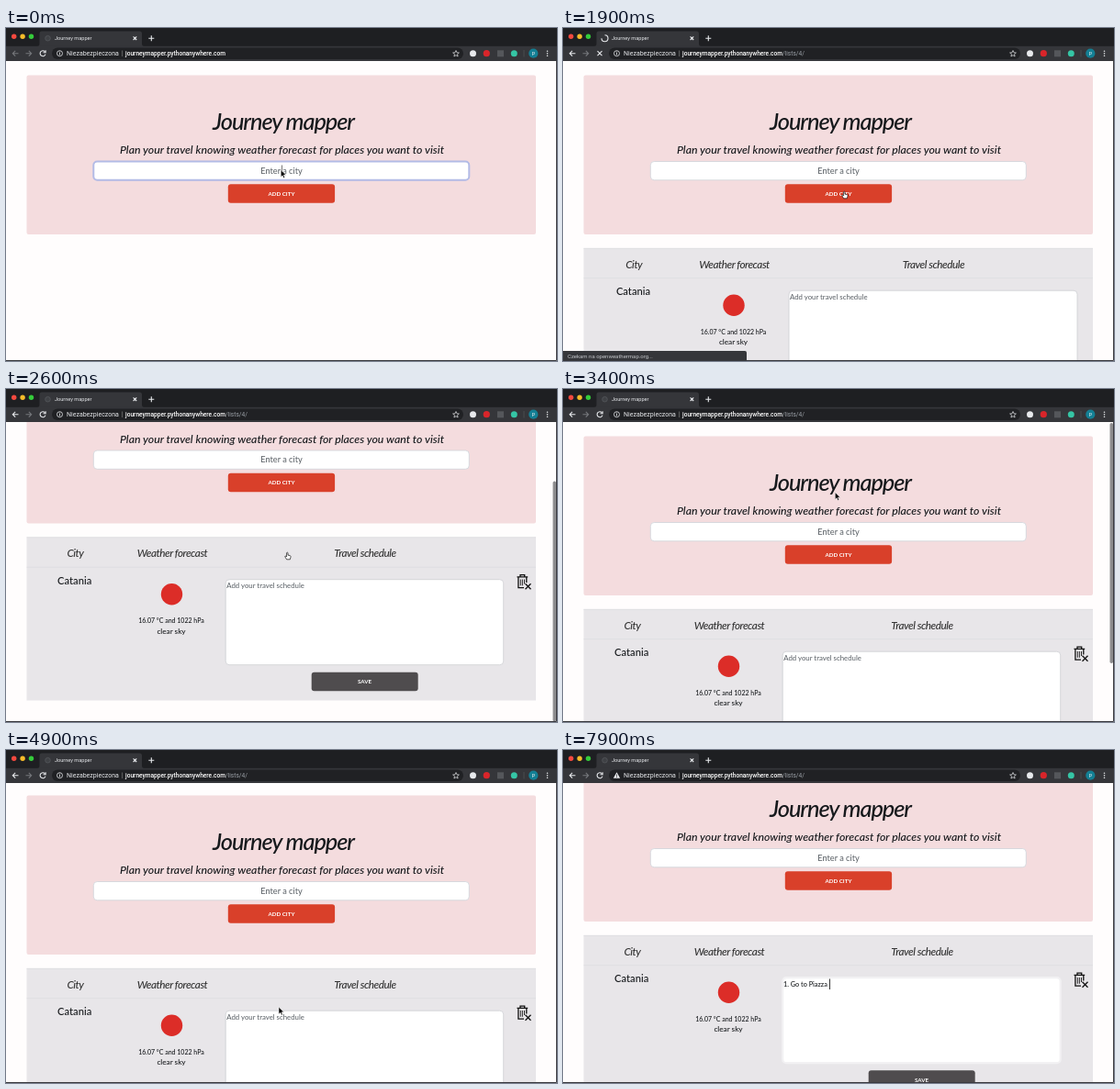
An HTML page for the animation above (8000 ms loop, 600x363 px).

```html
<!DOCTYPE html>
<html lang="en">
<head>
<meta charset="utf-8">
<title>Journey mapper</title>
<style>
  html, body { margin: 0; width: 100%; height: 100%; overflow: hidden; background: #fffdfd; }
  svg { display: block; width: 600px; height: 363px; }
  text { white-space: pre; font-family: Lato, sans-serif; fill: #16191c; }
  .mid { text-anchor: middle; }
  .hand { font-style: italic; font-weight: 500; text-anchor: middle; }
  .head { font-size: 11.7px; letter-spacing: -.45px; fill: #333; }
  .body { font-weight: 500; }
  .ui { font-family: Roboto, sans-serif; fill: #e8eaed; }
  .hint { fill: #565c62; }
  .btn { font-size: 6.2px; font-weight: 700; fill: #fff; text-anchor: middle; }
  .line { fill: none; stroke: #e8eaed; stroke-width: 1.1; }
</style>
</head>
<body>
<svg viewBox="0 0 600 363" xmlns="http://www.w3.org/2000/svg">
  <rect width="600" height="363" fill="#fffdfd"/>

  <g id="page">
    <rect x="22.5" y="51.5" width="554.5" height="173.5" rx="2" fill="#f4dcde"/>
    <text class="hand" x="302" y="110.5" font-size="25.4" letter-spacing="-1.1">Journey mapper</text>
    <text class="hand" x="300.5" y="137" font-size="12.3">Plan your travel knowing weather forecast for places you want to visit</text>
    <rect id="cityBox" x="95.3" y="145.5" width="409" height="20.3" rx="4" fill="#fff"/>
    <text id="cityHint" class="mid hint" x="300" y="158.6" font-size="9.2">Enter a city</text>
    <text id="cityText" class="mid" x="300" y="158.6" font-size="9.2"></text>
    <rect id="cityCaret" y="149.5" width=".8" height="11" fill="#555"/>
    <rect x="241.8" y="170.3" width="116.3" height="20.4" rx="3" fill="#d9402a"/>
    <text class="btn" x="300" y="182.8">ADD CITY</text>

    <g id="table">
      <rect x="22.5" y="240" width="554.5" height="178" fill="#e8e6e9"/>
      <path d="M22.5 240.3H577M22.5 272.7H577" stroke="#dcdce0" stroke-width=".8"/>
      <g id="cityCol">
        <text class="hand head" x="75.5" y="261.5">City</text>
        <text class="mid body" x="74.7" y="291.2" font-size="11.2">Catania</text>
      </g>
      <g id="skyCol">
        <text class="hand head" x="181" y="261.5">Weather forecast</text>
        <circle cx="180.5" cy="302.2" r="11.7" fill="#dc2d28"/>
        <text class="mid body" x="180" y="333.5" font-size="7">16.07 °C and 1022 hPa</text>
        <text class="mid body" x="180" y="345" font-size="8.2">clear sky</text>
      </g>
      <g id="planCol">
        <text class="hand head" x="391" y="261.5">Travel schedule</text>
        <rect x="332.7" y="387.3" width="116" height="20.4" rx="3" fill="#4f4c4e"/>
        <text class="btn" x="390.5" y="399.8">SAVE</text>
      </g>
      <rect id="noteBox" y="286.2" height="93" rx="4" fill="#fff"/>
      <text id="noteHint" class="hint" y="295.6" font-size="7.8">Add your travel schedule</text>
      <text id="noteText" class="body" x="240" y="295.6" font-size="7.3"></text>
      <rect id="noteCaret" y="287.5" width=".9" height="11.5" fill="#222"/>
      <g id="bin" fill="none" stroke="#111" stroke-width="1.3">
        <path d="M556.5 283.4H568.2M560 283.2V281.2H564.7V283.2M557.9 284V295.2H564M566.8 284V289.5"/>
        <path d="M560.3 286V292.8M562.4 286V292.8M564.5 286V291" stroke-width=".9"/>
        <path d="M565.5 290.7L571.5 296.7M571.5 290.7L565.5 296.7"/>
      </g>
    </g>
  </g>

  <rect id="thumb" x="595.5" width="3.6" height="262" rx="1.8" fill="#8d8d8f"/>
  <path d="M0 362.5H599.5V36" fill="none" stroke="#3a3a3f"/>

  <rect width="600" height="20" fill="#1e1f22"/>
  <circle cx="8.7" cy="9.3" r="2.7" fill="#f4493f"/>
  <circle cx="18.1" cy="9.3" r="2.7" fill="#f8bc2a"/>
  <circle cx="27.5" cy="9.3" r="2.7" fill="#35cc3b"/>
  <path d="M34 20Q36.5 20 36.5 17V6Q36.5 3.5 39 3.5H145.5Q148 3.5 148 6V17Q148 20 150.5 20Z" fill="#35363a"/>
  <circle id="icon" cx="45.5" cy="11.2" r="2.8" fill="#3f4145" stroke="#5a5c60" stroke-width=".7"/>
  <path id="spin" class="line" d="M45.5 7.7A3.5 3.5 0 1 1 42 11.2"/>
  <text class="ui" x="53" y="13.2" font-size="5.6">Journey mapper</text>
  <path class="line" d="M138.6 9.4L142.2 13M142.2 9.4L138.6 13M155.3 11.2H161.3M158.3 8.2V14.2"/>

  <rect y="19.8" width="600" height="16.2" fill="#35363a"/>
  <rect x="50" y="21.5" width="448" height="12.5" rx="6.2" fill="#202124"/>
  <path id="back" class="line" d="M13.5 27.7H7.3M10.2 24.8L7.3 27.7L10.2 30.6"/>
  <path class="line" style="stroke:#76787c" d="M21.5 27.7H27.7M24.8 24.8L27.7 27.7L24.8 30.6"/>
  <path id="reload" class="line" d="M42.3 25.6A3 3 0 1 0 43 28.6M43.1 24.2V26.7H40.6"/>
  <path id="stop" class="line" d="M37.5 25.2L42.5 30.2M42.5 25.2L37.5 30.2"/>
  <g id="info">
    <circle class="line" style="stroke-width:.8" cx="58.5" cy="27.7" r="3"/>
    <path class="line" style="stroke-width:.9" d="M58.5 27.2V29.4M58.5 25.7V26.5"/>
  </g>
  <g id="warn">
    <path d="M58.5 24.3L62.2 30.7H54.8Z" fill="#e8eaed"/>
    <path d="M58.5 26.6V28.6M58.5 29.1V29.9" stroke="#202124" stroke-width=".8"/>
  </g>
  <text class="ui" x="66" y="30.1" font-size="7">Niezabezpieczona</text>
  <path d="M126.5 24.5V31" stroke="#777" stroke-width=".7"/>
  <text class="ui body" x="130" y="30.1" font-size="6.6" style="fill:#fff">journeymapper.pythonanywhere.com<tspan id="path" fill="#9aa0a6" font-weight="400"></tspan></text>
  <path class="line" style="stroke-width:.7" d="M490 24.5L491 26.8L493.4 27L491.5 28.6L492.1 31L490 29.7L487.9 31L488.5 28.6L486.6 27L489 26.8Z"/>
  <circle cx="508.5" cy="27.7" r="3.5" fill="#e8eaed"/>
  <circle cx="523.3" cy="27.7" r="3.6" fill="#d9252a"/>
  <rect x="535" y="24.3" width="7" height="7" fill="#55575b"/>
  <circle cx="553.3" cy="27.7" r="3.5" fill="#35c5a5"/>
  <path d="M564 24V31.5" stroke="#55575b" stroke-width=".7"/>
  <circle cx="574.3" cy="27.7" r="5.1" fill="#137f94"/>
  <text class="ui mid" x="574.3" y="29.8" font-size="5.8">P</text>
  <g fill="#e8eaed"><circle cx="589.5" cy="25.2" r=".8"/><circle cx="589.5" cy="27.7" r=".8"/><circle cx="589.5" cy="30.2" r=".8"/></g>

  <g id="status">
    <path d="M0 352H198Q200 352 200 354V363H0Z" fill="#35363a"/>
    <text id="statusText" class="ui" x="5" y="359.6" font-size="6" style="fill:#c4c6ca"></text>
  </g>

  <g id="pointer">
    <path id="arrow" d="M0 0V7.6L1.8 6L3 8.8L4.3 8.2L3.1 5.5H5.5Z" fill="#000" stroke="#fff" stroke-width=".5"/>
    <path id="beam" d="M-1.5 -3.6Q0 -3.6 0 -2.6Q0 -3.6 1.5 -3.6M0 -2.6V2.6M-1.5 3.6Q0 3.6 0 2.6Q0 3.6 1.5 3.6M-.8 .8H.8" fill="none" stroke="#222" stroke-width=".9"/>
    <path id="finger" d="M-1.4 -3.4Q-.7 -4.3 0 -3.4V-.9L2.4 -.4Q3.2 0 3 1.2L2.3 3.8H-1.4L-3.2 .8Q-3.2 -.3 -2.2 .1L-1.4 .9Z" fill="#fff" stroke="#111" stroke-width=".7"/>
  </g>
</svg>

<script>
const LOOP = 8000, STEP = 100;
const el = {};
document.querySelectorAll('[id]').forEach(n => el[n.id] = n);

const show = (n, on) => n.style.display = on ? '' : 'none';
const set = (n, attrs) => { for (const k in attrs) n.setAttribute(k, attrs[k]); };
const within = (t, a, b) => t >= a && t < b;
const clamp = v => Math.max(0, Math.min(1, v));
const smooth = v => v * v * (3 - 2 * v);
const ramp = (t, a, b) => smooth(clamp((t - a) / (b - a)));

// keys: [time, x, y]
const pointerPath = [
  [900, 299.3, 154.8], [1000, 301, 160], [1300, 307, 182], [3000, 307, 182],
  [3600, 291, 78], [3800, 236, 31], [4000, 90, 24], [4100, 9, 12],
  [4300, 130, 27], [4500, 258, 31], [4600, 272, 60], [4800, 296, 260], [4900, 297, 280.3]
];
function along(keys, t) {
  if (t <= keys[0][0]) return keys[0].slice(1);
  for (let i = 1; i < keys.length; i++) {
    const [t0, x0, y0] = keys[i - 1], [t1, x1, y1] = keys[i];
    if (t <= t1) {
      const k = (t - t0) / (t1 - t0);
      return [x0 + (x1 - x0) * k, y0 + (y1 - y0) * k];
    }
  }
  return keys[keys.length - 1].slice(1);
}

function scrollAt(t) {
  if (t < 4500) return 78.5 * (ramp(t, 2000, 2600) - ramp(t, 2800, 3400));
  return 2 * ramp(t, 4800, 4900) + 36 * ramp(t, 4900, 5200);
}

// characters typed so far, one per step
const typed = (t, from, max) => Math.max(0, Math.min(max, Math.floor((t - from) / STEP) + 1));

function drawCity(t) {
  const loaded = t >= 1900, focus = t < 1400;
  const text = loaded ? '' : 'Catania'.slice(0, typed(t, 200, 7));
  el.cityText.textContent = text;
  show(el.cityHint, loaded || t < 100);
  set(el.cityBox, { stroke: focus ? '#b3bbe6' : '#ced4da', 'stroke-width': focus ? 2 : .8 });
  show(el.cityCaret, focus);
  const w = text ? el.cityText.getComputedTextLength() : 0;
  set(el.cityCaret, { x: 300 + w / 2 });
}

function drawTable(t) {
  const early = t < 2000;
  const shift = (n, x) => set(n, { transform: `translate(${early ? x : 0} 0)` });
  show(el.table, t >= 1900);
  shift(el.cityCol, 1.8);
  shift(el.skyCol, 5.5);
  shift(el.planCol, 12.5);
  show(el.bin, !early);

  const focus = t >= 5200;
  set(el.noteBox, {
    x: early ? 246 : 239.2, width: early ? 314 : 302.5,
    stroke: focus ? '#f2f1f3' : '#cdced2', 'stroke-width': focus ? 2.2 : .8
  });
  set(el.noteHint, { x: early ? 247 : 240.3 });
  show(el.noteHint, t < 5700);

  const count = typed(t, 5700, 6) + typed(t, 6400, 7) + typed(t, 7200, 3);
  el.noteText.textContent = '1. Go to Piazza '.slice(0, count);
  show(el.noteCaret, focus && !within(t, 5500, 5700));
  const w = count ? el.noteText.getComputedTextLength() : 0;
  set(el.noteCaret, { x: 240.4 + w });
}

function drawBrowser(t) {
  const busy = within(t, 1500, 2100), loaded = t >= 1900;
  show(el.spin, busy);
  show(el.icon, !busy);
  set(el.spin, { transform: `rotate(${(t - 1900) * .45} 45.5 11.2)` });
  show(el.stop, busy);
  show(el.reload, !busy);
  el.back.style.stroke = loaded ? '#e8eaed' : '#76787c';
  el.path.textContent = loaded ? '/lists/4/' : '';
  const warned = within(t, 100, 1900) || t >= 5700;
  show(el.warn, warned);
  show(el.info, !warned);
  show(el.status, busy);
  el.statusText.textContent =
    `Czekam na ${loaded ? 'openweathermap.org' : 'journeymapper.pythonanywhere.com'}...`;
}

function drawPointer(t) {
  const [x, y] = along(pointerPath, t);
  set(el.pointer, { transform: `translate(${x} ${y})` });
  show(el.pointer, t < 100 || within(t, 1000, 5700));
  const finger = within(t, 1200, 2900);
  const beam = within(t, 1000, 1200) || within(t, 3500, 3700) || t >= 5000;
  show(el.finger, finger);
  show(el.beam, beam);
  show(el.arrow, !finger && !beam);
}

function render(ms) {
  const t = Math.floor((ms % LOOP) / STEP) * STEP;
  const scroll = scrollAt(t);
  set(el.page, { transform: `translate(0 ${-scroll})` });
  set(el.thumb, { y: 37 + scroll * .81 });
  show(el.thumb, within(t, 2100, 3900) || within(t, 5000, 5300));
  drawCity(t);
  drawTable(t);
  drawBrowser(t);
  drawPointer(t);
}

function tick() {
  render(performance.now());
  requestAnimationFrame(tick);
}
tick();
</script>
</body>
</html>
```
